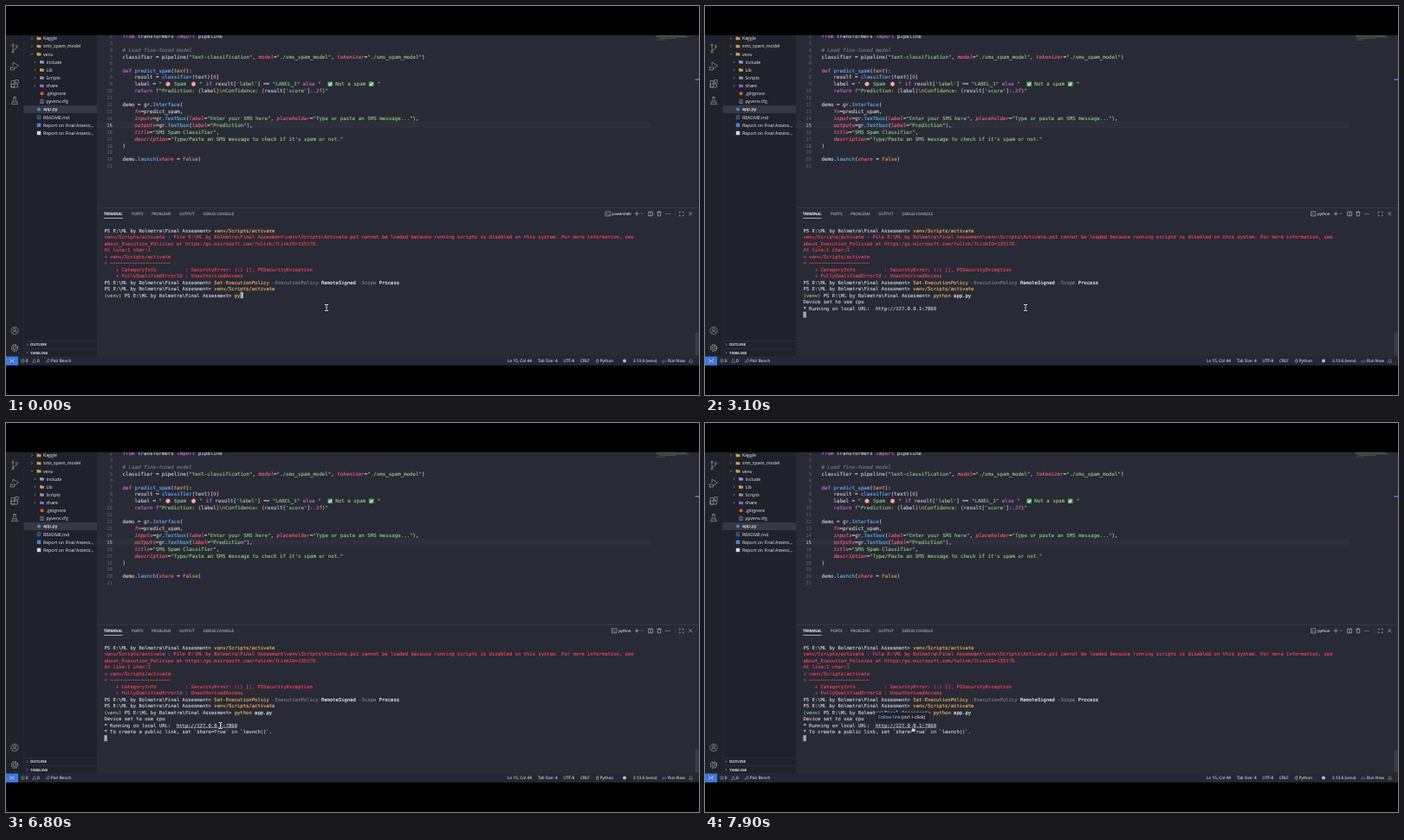
An HTML page for the animation above (8 s loop, 800x450 px).

```html
<!DOCTYPE html>
<html lang="en">
<head>
<meta charset="utf-8">
<title>Terminal session</title>
<style>
html, body { margin: 0; width: 100%; height: 100%; overflow: hidden; background: #000; }
svg { display: block; width: 100vw; height: 100vh; }
text { white-space: pre; text-rendering: geometricPrecision; }
.ui { font-family: "Open Sans", "Noto Sans", sans-serif; stroke-width: 0.1; }
.mono { font-family: "DejaVu Sans Mono", "Noto Sans Mono", monospace; }
.mono tspan { fill: currentColor; stroke: currentColor; stroke-width: 0.13; }
.w { color: #c6cad4; } .k { color: #d268dc; } .s { color: #8cc87c; } .f { color: #63aef0; }
.n { color: #d19a66; } .c { color: #747986; font-style: italic; } .d { color: #7c808c; }
.p { color: #ef5f72; font-style: italic; } .o { color: #d9a06c; font-style: italic; }
.e { color: #f2435a; } .t { color: #cbccd2; } .h { color: #f4f4f6; } .a { color: #efb060; }
</style>
</head>
<body>
<svg id="stage" viewBox="0 0 800 450"></svg>
<script>
const stage = document.getElementById('stage');
const CODE = 5.805, TERM = 5.553;
const PROMPT = 'PS E:\\ML by Bolmetra\\Final Assesment> ';
const GREY = '#a6a9b4';
let parent = stage;

function add(tag, attrs, content) {
  const el = document.createElementNS('http://www.w3.org/2000/svg', tag);
  for (const k in attrs) el.setAttribute(k, attrs[k]);
  if (content != null) el.textContent = content;
  parent.appendChild(el);
  return el;
}
const box = (x, y, width, height, fill, more) => add('rect', { x, y, width, height, fill, ...more });
const dot = (cx, cy, r, fill) => add('circle', { cx, cy, r, fill });
const ring = (cx, cy, r, stroke = GREY, width = 0.6, more) =>
  add('circle', { cx, cy, r, stroke, fill: 'none', 'stroke-width': width, ...more });
const line = (d, stroke = GREY, width = 0.6, fill = 'none') =>
  add('path', { d, stroke, fill, 'stroke-width': width, 'stroke-linejoin': 'round' });
const label = (x, y, text, size = 4.7, fill = '#d0d2d9', more) =>
  add('text', { x, y: y + size * 0.37, 'font-size': size, fill, stroke: fill, class: 'ui', ...more }, text);

// Runs of text: each "§" is followed by a one-letter colour class.
function mono(x, y, size, runs) {
  const text = add('text', { x, y: y + size * 0.42, 'font-size': size, class: 'mono' });
  for (const run of runs.split('§').slice(1)) {
    const span = document.createElementNS(stage.namespaceURI, 'tspan');
    span.setAttribute('class', run[0]);
    span.textContent = run.slice(1);
    text.appendChild(span);
  }
  return text;
}
function group(draw) {
  const outer = parent, g = add('g', {});
  parent = g;
  draw();
  parent = outer;
  return g;
}
const show = (el, on) => el.setAttribute('visibility', on ? 'visible' : 'hidden');

// Surfaces
box(0, 33, 800, 383, '#282a35');
box(0, 33, 105, 372, '#20222b');
box(20, 33, 0.5, 372, '#2a2c37');
box(105, 233, 695, 0.6, '#3d404c');
box(105, 133.6, 639, 7.9, '#2d303b');
box(20.5, 115, 84.5, 9, '#353845');
box(0, 405.5, 800, 10.5, '#252833');
box(0, 405.5, 14, 10.5, '#4078da');

// Activity bar
line('M8 46v6M12.5 47.5c0 3-4.5 2-4.5 4.5');
for (const [x, y] of [[8, 45], [8, 53], [12.5, 46.5]]) ring(x, y, 1.1);
line('M8 65l6.5 4-5 3.5M8 65v4M5.5 71h4v3h-4zM4.5 70l1 1M4.5 74l1-1');
line('M6 86.5h3.7v7.5H6zM6 90.2h7.5v3.8H6zM10.7 85.5h3.5v3.5h-3.5z');
line('M8 105.5h4M9 105.5v3l-2.7 5h7.4l-2.7-5v-3M7.6 111h4.8');
ring(10, 375.5, 4.2);
line('M7 378.4c1-2.5 5-2.5 6 0');
ring(10, 374.3, 1.5);
ring(10, 395.5, 3.6, GREY, 1.1, { 'stroke-dasharray': '1.7 1.1' });
ring(10, 395.5, 1.8, GREY, 0.7);

// File tree: name, depth, kind, colour
const chevron = (x, y, open) => line(open ? `M${x - 1.3} ${y - 0.7}l1.3 1.3 1.3-1.3` : `M${x - 0.7} ${y - 1.3}l1.3 1.3-1.3 1.3`);
const tree = [
  ['Kaggle', 0, 'folder', '#c9a05a'], ['sms_spam_model', 0, 'folder', '#c9a05a'],
  ['venv', 0, 'open', '#c9a05a'], ['Include', 1, 'folder', '#8fa0b5'],
  ['Lib', 1, 'folder', '#d99a4a'], ['Scripts', 1, 'folder', '#8d93a0'],
  ['share', 1, 'folder', '#8068d0'], ['.gitignore', 1, 'logo', '#e05a3a'],
  ['pyvenv.cfg', 1, 'file', '#b4b8c4'], ['app.py', 0, 'logo', '#4d88c4'],
  ['README.md', 0, 'file', '#5a9bd4'], ['Report on Final Assess...', 0, 'square', '#4a80d8'],
  ['Report on Final Assess...', 0, 'square', '#e2d3d7']
];
tree.forEach(([name, depth, kind, fill], i) => {
  const y = 37.4 + i * 9.13, x = 38 + depth * 3.5;
  if (kind === 'folder' || kind === 'open') {
    chevron(x - 8, y, kind === 'open');
    line(`M${x - 2.4} ${y - 1.8}h1.8l.6 .6h2.4v3h-4.8z`, 'none', 0, fill);
  } else if (kind === 'logo') dot(x, y, 2, fill);
  else if (kind === 'square') box(x - 2.2, y - 2.2, 4.4, 4.4, fill);
  else line(`M${x - 1.7} ${y - 2.1}h3.4v4.2h-3.4zM${x - 0.8} ${y - 0.6}h1.6M${x - 0.8} ${y + 0.8}h1.6`, fill, 0.5);
  label(x + 5, y, name, 5.2, name === 'app.py' ? '#f0f0f3' : '#c6c8d0');
});
[['OUTLINE', 391.7], ['TIMELINE', 401]].forEach(([name, y]) => {
  box(20.5, y - 4.7, 84.5, 0.5, '#343744');
  chevron(24.5, y);
  label(28, y, name, 4.3, '#c8cad2', { 'font-weight': 700 });
});

// Editor
const source = {
  2: '§kfrom§w transformers §kimport§w pipeline',
  4: '§c# Load fine-tuned model',
  5: '§wclassifier = pipeline(§s"text-classification"§w, §pmodel§w=§s"./sms_spam_model"§w, §ptokenizer§w=§s"./sms_spam_model"§w)',
  7: '§kdef§f predict_spam§w(§otext§w):',
  8: '§w    result = §fclassifier§w(text)[§n0§w]',
  9: '§w    label = §s"',
  10: '§k    return f§s"Prediction: §n{§wlabel§n}\\n§sConfidence: §n{§wresult[§s\'score\'§w]§k:.2f§n}§s"',
  12: '§wdemo = gr.§fInterface§w(',
  13: '§p    fn§w=predict_spam,',
  14: '§p    inputs§w=gr.§fTextbox§w(§plabel§w=§s"Enter your SMS here"§w, §pplaceholder§w=§s"Type or paste an SMS message..."§w),',
  15: '§p    outputs§w=gr.§fTextbox§w(§plabel§w=§s"Prediction"§w),',
  16: '§p    title§w=§s"SMS Spam Classifier"§w,',
  17: '§p    description§w=§s"Type/Paste an SMS message to check if it\'s spam or not."',
  18: '§w)',
  20: '§wdemo.§flaunch§w(§pshare §w= §nFalse§w)'
};
const rowY = n => 34.5 + (n - 2) * 7.92;
for (let n = 2; n <= 21; n++) {
  add('text', { x: 123, y: rowY(n) + 2.3, 'font-size': 5.6, 'text-anchor': 'end', class: 'mono', fill: n === 15 ? '#c5c7cf' : '#646875' }, n);
  if (source[n]) mono(134.5, rowY(n), CODE, source[n]);
}
const y9 = rowY(9);
mono(194, y9, CODE, '§sSpam');
mono(223.5, y9, CODE, '§s"');
mono(231, y9, CODE, '§kif§w result[§s\'label\'§w] == §s"LABEL_1" §kelse §s"');
mono(380.3, y9, CODE, '§sNot a spam');
mono(428.8, y9, CODE, '§s"');
for (const x of [187, 216.5]) {
  dot(x, y9 + 0.3, 2.4, '#e6dcdf');
  ring(x, y9 + 0.3, 2.4, '#d4505e', 0.9);
  line(`M${x - 1.7} ${y9 - 1.4}l3.4 3.4`, '#d4505e', 0.8);
}
for (const x of [374.2, 421.7]) {
  box(x - 2.8, y9 - 2.5, 5.6, 5.6, '#4fa862', { rx: 0.8 });
  line(`M${x - 1.7} ${y9 + 0.3}l1.2 1.4 2.3-2.8`, '#eaf5ea', 1.1);
}
box(795.5, 84.3, 4.5, 1.5, '#4f83d6');

// Minimap
[[751, 34, 34, '#6f8a58'], [751, 35.6, 37, '#8a8458'], [754, 37.2, 20, '#7d6a5a'], [751, 38.8, 10, '#5f6a58']]
  .forEach(([x, y, w, c]) => box(x, y, w, 0.7, c, { opacity: 0.75 }));

// Panel header
[['TERMINAL', 113], ['PORTS', 145], ['PROBLEMS', 168], ['OUTPUT', 200.3], ['DEBUG CONSOLE', 227.5]].forEach(([name, x], i) =>
  label(x, 240.5, name, 4.35, i ? '#adb0ba' : '#f0f0f3', { 'font-weight': i ? 400 : 600 }));
box(113, 245, 21.7, 0.7, '#d9dae0');
const shellTab = (name, x) => group(() => {
  line(`M${x} 237.8h5.4v5.2h-5.4zM${x + 1} 239.2l1.3 1.2-1.3 1.2M${x + 2.8} 241.7h1.5`, '#c4c6ce', 0.55);
  label(721.5, 240.3, name, 4.35, '#d8dae0', { 'text-anchor': 'end' });
});
const powershell = shellTab('powershell', 692), python = shellTab('python', 699.5);
line('M725.7 240.3h5M728.2 237.8v5', '#c4c6ce');
chevron(734.3, 240.2, true);
line('M741.6 238h5v4.8h-5zM744.1 238v4.8', '#c4c6ce');
line('M751.5 238.6h5M752.2 238.6l.3 4.3h3l.3-4.3M753.2 238.5v-.8h1.6v.8', '#c4c6ce');
for (const x of [762, 764, 766]) dot(x, 240.4, 0.5, '#c4c6ce');
box(772, 238, 0.4, 5, '#4a4d5a');
line('M777.4 239.5v-1.4h1.4M780.7 238.1h1.4v1.4M782.1 241.4v1.4h-1.4M778.8 242.8h-1.4v-1.4', '#c4c6ce');
line('M788.2 238.3l4 4M792.2 238.3l-4 4', '#c4c6ce');
box(795.5, 378, 4, 26, '#3a3d49');

// Status bar
line('M4.5 408.5l2 2-2 2M9.5 408.5l-2 2 2 2', '#fff', 0.7);
ring(19.5, 410.5, 1.9, GREY, 0.5);
line('M18.7 409.7l1.6 1.6M20.3 409.7l-1.6 1.6', GREY, 0.5);
line('M30.5 412.3l2.2-3.8 2.2 3.8z', GREY, 0.5);
line('M46.5 412.5c0-2 1-3 2.5-3v-1.3l2 2-2 2v-1.2c-1 0-1.8 .5-2.5 1.5z', GREY, 0.5);
line('M759 412.5l1.2-3M758.3 409.5c-.8 1-.8 2 0 3M761.5 409.5c.8 1 .8 2 0 3', GREY, 0.5);
line('M788.5 412h4.2c-1-1-.5-3.5-2.1-3.5s-1.1 2.5-2.1 3.5zM790.2 412.8h.8', GREY, 0.5);
dot(714, 410.4, 2, '#b9bbc4');
[['0', 22.7], ['0', 36], ['Pair Bench', 52], ['Ln 15, Col 44', 579], ['Tab Size: 4', 614], ['UTF-8', 643.5], ['CRLF', 663],
 ['{} Python', 681], ['3.13.6 (venv)', 724], ['Run Now', 764]].forEach(([text, x]) => label(x, 410.5, text));

// Terminal
const termY = i => 259.5 + i * 7.5;
const term = (i, runs) => mono(113.4, termY(i), TERM, runs);
const errors = [
  'venv/Scripts/activate : File E:\\ML by Bolmetra\\Final Assesment\\venv\\Scripts\\Activate.ps1 cannot be loaded because running scripts is disabled on this system. For more information, see',
  'about_Execution_Policies at https:/go.microsoft.com/fwlink/?LinkID=135170.',
  'At line:1 char:1',
  '+ venv/Scripts/activate',
  '+ ' + '~'.repeat(21),
  '    + CategoryInfo          : SecurityError: (:) [], PSSecurityException',
  '    + FullyQualifiedErrorId : UnauthorizedAccess'
];
term(0, '§t' + PROMPT + '§avenv/Scripts/activate');
errors.forEach((text, i) => term(i + 1, '§e' + text));
term(8, '§t' + PROMPT + '§aSet-ExecutionPolicy §d-ExecutionPolicy §hRemoteSigned §d-Scope §hProcess');
term(9, '§t' + PROMPT + '§avenv/Scripts/activate');
const [command, script] = term(10, '§s(venv) §t' + PROMPT + '§a §h ').querySelectorAll('.a, .h');
const output = [
  [2900, term(11, '§tDevice set to use cpu')],
  [3000, term(12, '§t* Running on local URL:  http://127.0.0.1:7860')],
  [3500, term(13, '§t* To create a public link, set `share=True` in `launch()`.')]
];
const caret = box(0, 0, 3.4, 7, '#a9abb3');
const underline = box(196.7, 352.4, 70, 0.5, '#c3c4ca');
const tooltip = group(() => {
  box(197, 334.7, 62, 11.6, '#20222b', { stroke: '#3a3d49', 'stroke-width': 0.5, rx: 0.8 });
  label(200, 340.1, 'Follow link', 5.25, '#6ea8f8');
  label(227, 340.1, '(ctrl + click)', 5.25, '#d8dae0');
});

// Pointers, centred on their own origin
const beam = group(() => {
  for (const [c, w] of [['#15161c', 1.9], ['#fff', 0.9]])
    line('M-2-3.5h1.5l.5 .5 .5-.5h1.5M0-3v6M-2 3.5h1.5l.5-.5 .5 .5h1.5', c, w);
});
const hand = group(() => line('M-1.2-3.5q.7-.8 1.4 0v2.5l2.3 .5q1 .3 .8 1.5l-.5 2.5h-3.8l-2-2.7q-.2-1 .9-.6l.9 .8z', '#15161c', 0.9, '#d4d5da'));

const keyTimes = [500, 600, 700, 800, 900, 1000, 1300, 1500, 1800, 1900, 2000];
const path = [[6000, 370, 349], [6100, 355, 340], [6400, 300, 343], [6700, 255, 349], [6900, 240, 351], [7500, 240, 351], [7700, 240, 354]];

function pointerAt(t) {
  const next = path.findIndex(k => k[0] > t);
  if (next === 0) return path[0].slice(1);
  if (next < 0) return path[path.length - 1].slice(1);
  const a = path[next - 1], b = path[next], f = (t - a[0]) / (b[0] - a[0]);
  return [a[1] + (b[1] - a[1]) * f, a[2] + (b[2] - a[2]) * f];
}

function draw(now) {
  const t = Math.floor(now % 8000 / 100) * 100;
  const typed = 'python app.py'.slice(0, 2 + keyTimes.filter(k => k <= t).length);
  command.textContent = typed.slice(0, 7);
  script.textContent = typed.slice(7);

  let row = t < 2800 ? 10 : 11;
  for (const [start, el] of output) {
    show(el, t >= start);
    if (t >= start) row++;
  }
  caret.setAttribute('x', 113.4 + (row === 10 ? (45 + typed.length) * TERM * 0.602 : 0));
  caret.setAttribute('y', termY(row) - 3.4);

  show(powershell, t < 2900);
  show(python, t >= 2900);
  show(underline, t >= 6800);
  show(tooltip, t >= 7000);
  show(beam, t < 7600);
  show(hand, t >= 7600);
  const at = `translate(${pointerAt(t)})`;
  beam.setAttribute('transform', at);
  hand.setAttribute('transform', at);
}

const begin = performance.now();
function tick() {
  draw(performance.now() - begin);
  requestAnimationFrame(tick);
}

// Letterbox bands
box(0, 0, 800, 33.7, '#000');
box(0, 415.8, 800, 34.2, '#000');
tick();
</script>
</body>
</html>
```
